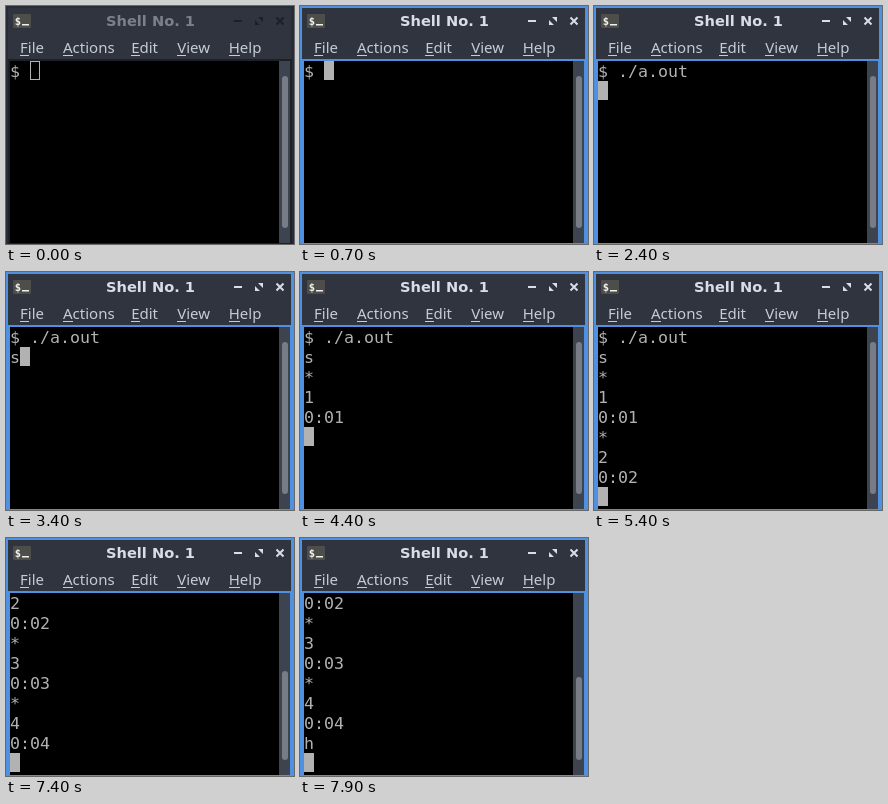
An HTML page that plays this animation: 288 by 238 pixels, repeating every 8 s.

```html
<!DOCTYPE html>
<html lang="en">
<head>
<meta charset="utf-8">
<title>Shell</title>
<style>
html, body { margin: 0; width: 100%; height: 100%; overflow: hidden; background: #2f343f; }
svg { display: block; width: 100vw; height: 100vh; }
text { white-space: pre; }
.title { font: bold 14.6px "DejaVu Sans", sans-serif; text-anchor: middle; fill: #d8dee8; }
.menu { font: 15px "Noto Sans", sans-serif; fill: #c6ccd6; }
.term { font: 16.61px "DejaVu Sans Mono", monospace; fill: #b2b2b2; }
.icon { font: bold 10.5px "DejaVu Sans Mono", monospace; fill: #f0f0ec; }
.buttons { stroke: #d8dee8; fill: none; stroke-width: 2; }
.buttons .solid { fill: #d8dee8; stroke: none; }
.edge, .frame { fill: #4f91e0; }
.idle .title { fill: #7b808b; }
.idle .buttons { stroke: #1c1f27; }
.idle .buttons .solid { fill: #1c1f27; }
.idle .edge { fill: #282c36; }
.idle .frame { fill: #1d2029; }
</style>
</head>
<body>
<svg id="win" viewBox="0 0 288 238" xmlns="http://www.w3.org/2000/svg">
  <rect class="edge" width="288" height="238"/>
  <rect x="2" y="2" width="283" height="236" fill="#2f343f"/>

  <rect x="7" y="8" width="18" height="14" rx="1" fill="#4d4d49"/>
  <text class="icon" x="8.7" y="18.6">$</text>
  <rect x="16" y="18" width="7" height="1.5" fill="#f0f0ec"/>
  <text class="title" x="144.5" y="20">Shell No. 1</text>
  <g class="buttons">
    <path d="M228 15H236"/>
    <path class="solid" d="M252 11H257V16ZM249 14V19H254Z"/>
    <path d="M270.5 11.5L277.5 18.5M277.5 11.5L270.5 18.5"/>
  </g>
  <g id="menu" class="menu"></g>

  <rect class="frame" x="2" y="53" width="284" height="185"/>
  <rect x="4" y="55" width="269" height="182" fill="#000"/>
  <rect x="273" y="55" width="11" height="182" fill="#3e4350"/>
  <rect id="thumb" x="276" width="6" rx="3" fill="#787c87"/>
  <g id="lines" class="term"></g>
  <rect id="cursor"/>
</svg>
<script>
const NS = 'http://www.w3.org/2000/svg';
const LOOP = 8000, ROWS = 9, CELL = 10, PITCH = 20, LEFT = 4, TOP = 55;
const $ = id => document.getElementById(id);

function set(el, attrs) {
  for (const k in attrs) el.setAttribute(k, attrs[k]);
  return el;
}
function add(parent, tag, attrs, text = '') {
  const el = set(document.createElementNS(NS, tag), attrs);
  el.textContent = text;
  return parent.appendChild(el);
}

// label, x, width of the underlined letter
[['File', 14, 9], ['Actions', 57, 10], ['Edit', 125.2, 9], ['View', 171.2, 9], ['Help', 222.7, 11]]
  .forEach(([label, x, w]) => {
    add($('menu'), 'text', { x, y: 47 }, label);
    add($('menu'), 'rect', { x: Math.round(x), y: 49, width: w, height: 1 });
  });

const rows = Array.from({ length: ROWS }, (_, i) =>
  add($('lines'), 'text', { x: LEFT, y: TOP + 16 + i * PITCH }));

const tick = n => `*\n${n}\n0:0${n}\n`;
// time in ms, text appended to the terminal
const output = [
  [0, '$ '], [1200, './'], [1400, 'a'], [1900, '.'], [2000, 'out '], [2400, '\n'],
  [3400, 's'], [3700, '\n'],
  [4400, tick(1)], [5400, tick(2)], [6400, tick(3)], [7400, tick(4)],
  [7800, 'h'], [7900, '\n']
];

function draw(t) {
  const focused = t >= 700;
  $('win').classList.toggle('idle', !focused);

  const all = output.filter(o => o[0] <= t).map(o => o[1]).join('').split('\n');
  const view = all.slice(-ROWS);
  rows.forEach((row, i) => { row.textContent = view[i] || ''; });

  const last = view.length - 1;
  const x = LEFT + view[last].length * CELL, y = TOP + last * PITCH;
  set($('cursor'), focused
    ? { x, y, width: 10, height: 19, fill: '#b2b2b2', stroke: 'none' }
    : { x: x + .5, y: y + .5, width: 9, height: 18, fill: 'none', stroke: '#b2b2b2' });

  const top = all.length > ROWS ? Math.round(222 - 148 * ROWS / all.length) : 70;
  set($('thumb'), { y: top, height: 222 - top });
}

const start = performance.now();
function frame() {
  draw((performance.now() - start) % LOOP);
  requestAnimationFrame(frame);
}
frame();
</script>
</body>
</html>
```
